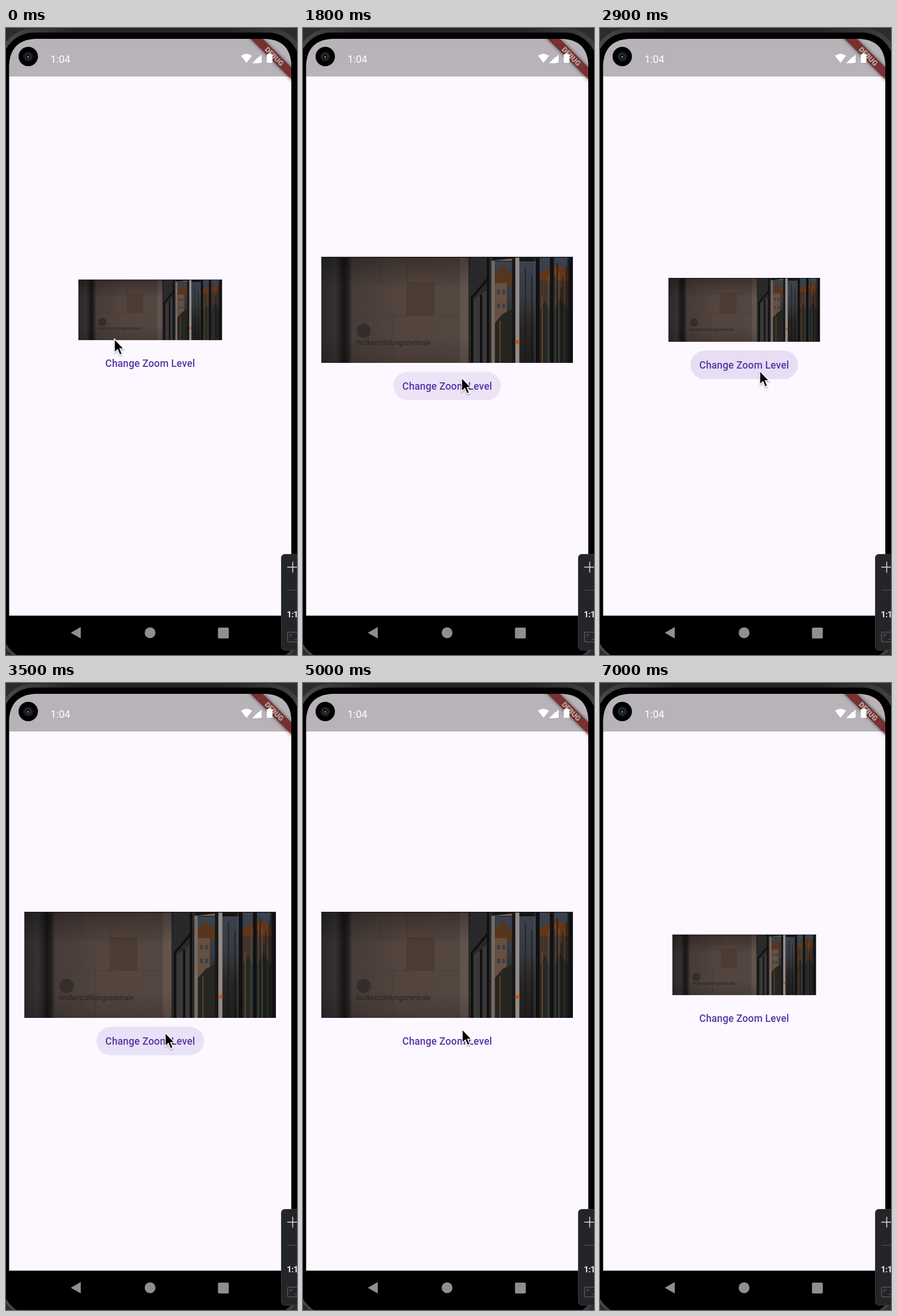
Recreate the animation shown at these times as an HTML page. Size 510 by 1099 pixels, loop 7.1 s.

```html
<!DOCTYPE html>
<html lang="en">
<head>
<meta charset="utf-8">
<title>Zoom level</title>
<style>
  html, body { margin: 0; height: 100%; overflow: hidden; background: #000; }
  svg { display: block; width: 100vw; height: 100vh; }
  text { font-family: Roboto, sans-serif; }
</style>
</head>
<body>
<svg viewBox="0 0 510 1099">
  <defs>
    <clipPath id="screen"><path d="M5.5 1030V66Q7 21 52 19H454Q499 21 500 66V1030Z"/></clipPath>
    <clipPath id="frame"><rect width="441" height="186"/></clipPath>
    <filter id="soft" x="-30%" y="-100%" width="160%" height="300%"><feGaussianBlur stdDeviation="3"/></filter>
    <filter id="drop" x="-50%" y="-50%" width="200%" height="200%">
      <feDropShadow dx="0" dy="1.5" stdDeviation="1.3" flood-opacity=".4"/>
    </filter>
    <linearGradient id="metal">
      <stop offset="0" stop-color="#4c4c4e"/><stop offset=".25" stop-color="#252527"/>
      <stop offset=".75" stop-color="#252527"/><stop offset="1" stop-color="#434345"/>
    </linearGradient>
    <linearGradient id="wall">
      <stop offset="0" stop-color="#2b2829"/><stop offset=".1" stop-color="#353132"/>
      <stop offset=".16" stop-color="#171516"/><stop offset=".19" stop-color="#231f1f"/>
      <stop offset=".22" stop-color="#463c39"/><stop offset=".55" stop-color="#53443e"/>
      <stop offset="1" stop-color="#544640"/>
    </linearGradient>
    <linearGradient id="shade" x2="0" y2="1">
      <stop offset="0" stop-opacity=".3"/><stop offset=".3" stop-opacity="0"/>
      <stop offset=".75" stop-opacity="0"/><stop offset="1" stop-opacity=".15"/>
    </linearGradient>
    <linearGradient id="glass" x2="0" y2="1">
      <stop offset="0" stop-color="#3a4250"/><stop offset=".35" stop-color="#373a40"/>
      <stop offset=".65" stop-color="#282624"/><stop offset="1" stop-color="#1e1e1d"/>
    </linearGradient>
  </defs>

  <!-- phone body -->
  <rect width="510" height="1099" fill="#2c2c2f"/>
  <rect x="-12" y="1" width="534" height="1110" rx="60" fill="url(#metal)"/>
  <rect x="-7" y="8" width="522" height="1100" rx="56"/>

  <g clip-path="url(#screen)">
    <rect width="510" height="1030" fill="#fdf8ff"/>
    <g transform="translate(501 19) rotate(45)">
      <rect x="-70" y="36" width="140" height="15" filter="url(#soft)" opacity=".6"/>
      <rect x="-70" y="36" width="140" height="15" fill="#a84242"/>
      <text y="48" text-anchor="middle" font-size="12.75" font-weight="900" fill="#fff" fill-opacity=".92">DEBUG</text>
    </g>
    <rect width="510" height="85" opacity=".28"/>
  </g>

  <!-- status bar -->
  <circle cx="39" cy="50" r="17"/>
  <circle cx="39" cy="50" r="9" fill="#15171a"/>
  <circle cx="39" cy="50" r="5" fill="#0c0f12" stroke="#353a3f" stroke-width="1.5"/>
  <circle cx="39" cy="50.5" r="1.6" fill="#8b949b"/>
  <g fill="#fff">
    <text x="78" y="60.5" font-size="18">1:04</text>
    <path d="M412 49Q421.5 41.5 431 49L421.5 61Z"/>
    <path d="M433 61L448 46V61Z" fill-opacity=".35"/>
    <path d="M433 61L442.5 51.5V61ZM447.3 47.5V60.3H435" stroke="#fff" stroke-width="1.3"/>
    <path d="M457 46H460V44.5H464V46H467V61H457Z"/>
  </g>

  <!-- photo, drawn at full size -->
  <g id="photo"><g clip-path="url(#frame)">
    <rect width="441" height="186" fill="#161516"/>
    <rect width="246" height="186" fill="url(#wall)"/>
    <rect x="150" y="45" width="47" height="58" fill="#4a392f" opacity=".7"/>
    <path d="M102 0V45M150 0V103M197 45V103M53 45H242M53 103H242M124 103V186" fill="none" stroke="#352b28" opacity=".35"/>
    <path id="specks" stroke="#2a2220" opacity=".55"/>
    <rect x="243" width="15" height="186" fill="#62534c"/>
    <rect x="258" width="42" height="186" fill="#29282a"/>
    <rect width="261" height="186" fill="url(#shade)"/>
    <path d="M267 76L290 58V186H267Z" fill="#3a3739"/>
    <path d="M262 74L292 38M264 74V186M280 66V186M292 0V186" fill="none" stroke="#0f0f10" stroke-width="4"/>

    <rect x="304" y="8" width="74" height="178" fill="url(#glass)"/>
    <path d="M304 32L318 14L334 34V52H304Z" fill="#57351f"/>
    <rect x="304" y="46" width="21" height="70" fill="#665041"/>
    <path d="M308 62H322M308 86H322" stroke="#3a3f48" stroke-width="8" stroke-dasharray="5 4"/>
    <path d="M304 186V116L318 100L334 92V186Z" fill="#252622"/>
    <path d="M313 112V186" stroke="#6a4424" stroke-width="2"/>
    <path d="M298 7L336 3V7H304V186H298Z" fill="#776a63"/>
    <rect x="334" width="6" height="186" fill="#18181a"/>
    <rect x="340" width="7" height="186" fill="#938b88"/>
    <circle cx="344" cy="149" r="3.5" fill="#c75518"/>

    <rect x="382" width="51" height="186" fill="url(#glass)"/>
    <path d="M382 30L412 14L433 24V42H382Z" fill="#633619"/>
    <path d="M382 42H433V90H382Z" fill="#443328"/>
    <path d="M382 186V96L392 76L404 104L418 72L433 94V186Z" fill="#262823"/>
    <path d="M387 70V186" stroke="#6b4525" stroke-width="2"/>
    <path id="streaks" stroke="#0d0e10" opacity=".5" stroke-width="2"/>
    <path id="gleams" stroke="#858a90" opacity=".45"/>
    <path d="M379 0V186M404 0V186M437 0V186" stroke="#101113" stroke-width="7"/>
    <path d="M0 .75H441" stroke="#1b1a1a" stroke-width="1.5"/>
    <circle cx="74" cy="130" r="12.5" fill="#352d2b"/>
    <text x="60" y="155" font-size="12.2" fill="#2a2220">Wolkenzählungszentrale</text>
  </g></g>

  <g id="button">
    <rect id="pill" x="158.5" y="-25" width="188.5" height="50" rx="25" fill="#5934a6"/>
    <text x="252.7" y="6" text-anchor="middle" font-size="17.5" font-weight="500" letter-spacing=".125" fill="#5934a6">Change Zoom Level</text>
  </g>

  <!-- navigation bar and side panel -->
  <g fill="#918d91">
    <path d="M113.5 1060L131 1050V1070Z"/>
    <circle cx="252.5" cy="1060" r="9.5"/>
    <rect x="371.5" y="1051" width="19" height="19" rx="2"/>
  </g>
  <rect x="482.5" y="922.5" width="50" height="168" rx="6" fill="#242529" stroke="#3b3c40"/>
  <path d="M493 945H512M502.5 935.5V954.5" stroke="#dfe0e3" stroke-width="1.5"/>
  <path d="M493 985.5H510" stroke="#56575b"/>
  <text x="492" y="1033" font-size="15.5" font-weight="700" letter-spacing="-.9" fill="#dfe0e3">1:1</text>
  <g fill="none" stroke="#55565a" stroke-width="1.5">
    <rect x="493.5" y="1059" width="24" height="17" rx="2"/>
    <path d="M498 1067V1063.5H502M506 1071.5H510"/>
  </g>

  <path id="cursor" d="M0 0V24L5.5 18.8L9.5 28L13.5 26.3L9.6 17.3H16.5Z" stroke="#fff" stroke-width="1.5" filter="url(#drop)"/>
</svg>
<script>
const LOOP = 7100, STEP = 100, ZOOM_TIME = 300, MOVE_TIME = 600;
const SMALL = 252, LARGE = 441, RATIO = 186 / 441;
const CENTER_X = 252.7, CENTER_Y = 494;

// Each press toggles between the two sizes.
const presses = [990, 2027, 2878, 3650, 4548, 6100];

// Places where the cursor comes to rest: arrival time, x, y.
const stops = [
  [0, 190, 545], [700, 278, 593], [1700, 278, 613], [2800, 280, 601],
  [3500, 279, 613], [4100, 279, 607], [5600, 279, 613], [6700, 250, 560]
];

const $ = id => document.getElementById(id);
const clamp = v => Math.max(0, Math.min(1, v));
const smooth = p => p * p * (3 - 2 * p);
const move = (el, x, y, more = "") => el.setAttribute("transform", `translate(${x} ${y})${more}`);

let seed = 7;
const random = (min, max) => {
  seed = seed * 16807 % 2147483647;
  return min + (max - min) * seed / 2147483647;
};
const scatter = (id, count, line) =>
  $(id).setAttribute("d", Array.from({ length: count }, line).join(""));

scatter("specks", 180, () => `M${random(53, 242)} ${random(4, 182)}h${random(.5, 1.5)}`);
scatter("streaks", 9, () => `M${random(349, 432)} ${random(0, 60)}V186`);
scatter("gleams", 7, () => `M${random(349, 432)} ${random(0, 40)}V186`);

const widthAt = t => SMALL + (LARGE - SMALL) * presses.reduce((z, start, i) =>
  z + (i % 2 ? -1 : 1) * clamp((t - start) / ZOOM_TIME), 0);
const buttonAt = t => CENTER_Y + widthAt(t) * RATIO / 2 + 40.5;

const cursorAt = t => stops.reduce((from, [arrival, ...to]) => {
  const p = smooth(clamp((t - arrival) / MOVE_TIME + 1));
  return from.map((v, i) => v + (to[i] - v) * p);
}, stops[0].slice(1));

function hovered(t) {
  const [x, y] = cursorAt(t);
  return Math.abs(x - CENTER_X) < 94 && Math.abs(y - buttonAt(t)) < 20;
}

// The hover tint fades over a few moments; a press deepens it briefly.
function glowAt(t) {
  const hover = [0, 50, 100, 150].filter(ago => hovered(t - ago)).length / 4;
  const press = Math.max(...presses.map(p => clamp(1.5 - Math.abs(t - p - 50) / 250)));
  return .08 * hover + .054 * press;
}

function draw(now) {
  const t = Math.floor(now % LOOP / STEP) * STEP;
  const width = widthAt(t);
  move($("photo"), CENTER_X - width / 2, CENTER_Y - width * RATIO / 2, ` scale(${width / LARGE})`);
  move($("button"), 0, buttonAt(t));
  $("pill").setAttribute("opacity", glowAt(t));
  move($("cursor"), ...cursorAt(t));
  $("cursor").setAttribute("visibility", t < 6500 ? "visible" : "hidden");
}

const begin = performance.now();
function tick() {
  draw(performance.now() - begin);
  requestAnimationFrame(tick);
}
tick();
</script>
</body>
</html>
```
